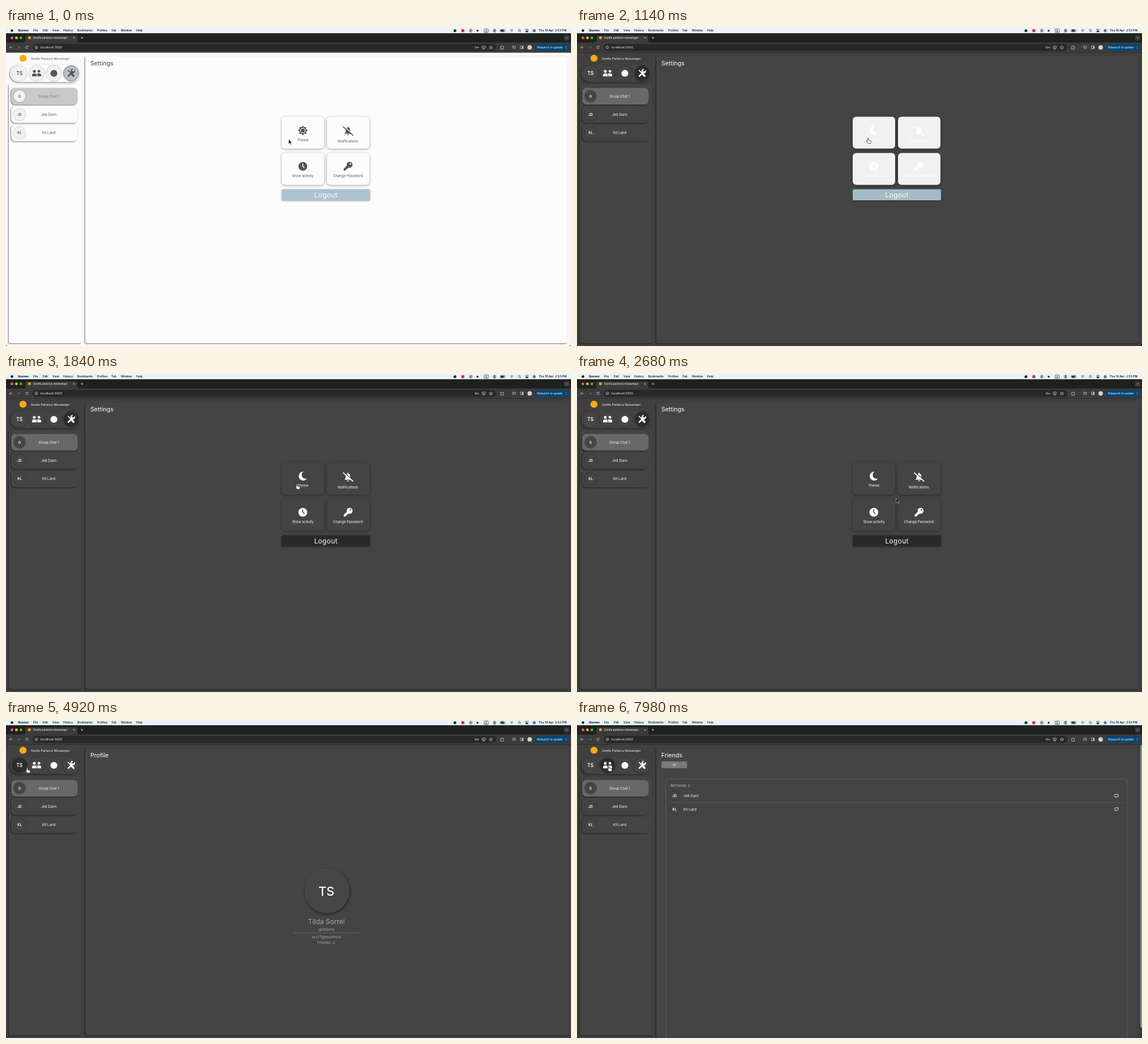
Write an HTML page that moves like this. It is 998 px wide and 561 px high and loops after 8000 ms.

```html
<!DOCTYPE html>
<html lang="en">
<head>
<meta charset="utf-8">
<title>Messenger settings</title>
<style>
html, body { margin: 0; width: 100%; height: 100%; overflow: hidden; background: #000; }
svg { display: block; width: 998px; height: 561px; font-family: Inter, Roboto, sans-serif;
  --page: #f9f9f9; --panel: #fcfcfc; --ink: #555; --title: #444; --item: #fcfcfc; --pick: #c9c9c9;
  --pickText: #777; --avatar: #f0f1f2; --shade: rgba(0,0,0,.55); --soft: rgba(0,0,0,.38); }
svg.dark { --page: #404040; --panel: #444; --ink: #fff; --title: #fff; --item: #444; --pick: #686868;
  --pickText: #f4f4f4; --avatar: #454545; --shade: rgba(0,0,0,.5); --soft: rgba(0,0,0,.4); }
text { white-space: pre; }
.mid { text-anchor: middle; }
.bold { font-weight: 600; }
.ink { fill: var(--ink); }
.line { fill: none; stroke: var(--ink); }
.panel { fill: var(--panel); filter: drop-shadow(-1px 1px 1.3px var(--shade)); }
.item { fill: var(--item); filter: drop-shadow(-.4px 1px .8px var(--shade)); }
.pick { fill: var(--pick); }
.avatar { fill: var(--avatar); filter: drop-shadow(0 .5px .8px var(--soft)); }
.nav { filter: drop-shadow(0 .5px .8px var(--soft)); }
.tile { fill: var(--tile); filter: drop-shadow(0 1.5px 2px var(--soft)); }
.logout { fill: var(--logout); filter: drop-shadow(0 1px 1.5px var(--soft)); }
.hole { fill: var(--tile); }
.cut { fill: none; stroke: var(--tile); }
.title { fill: var(--title); font-size: 10.6px; }
.grey { fill: #a9a9a9; }
.glyph { fill: none; stroke: #d8d8d8; stroke-width: .75; }
.bar { fill: none; stroke: #222; stroke-width: .7; }
</style>
</head>
<body>
<svg id="stage" viewBox="0 0 998 561"></svg>
<script>
const text = (x, y, size, s, attr = '') => `<text x="${x}" y="${y}" font-size="${size}" ${attr}>${s}</text>`;
const box = (x, y, w, h, r, attr) => `<rect x="${x}" y="${y}" width="${w}" height="${h}" rx="${r}" ${attr}/>`;
const disc = (x, y, r, attr) => `<circle cx="${x}" cy="${y}" r="${r}" ${attr}/>`;
const path = (d, attr) => `<path d="${d}" ${attr}/>`;
const INK = 'class="ink"', MID = 'class="ink mid"', BOLD = 'class="ink mid bold"';

function menuBar() {
  const words = [['File', 48], ['Edit', 65], ['View', 82], ['History', 101], ['Bookmarks', 126],
    ['Profiles', 161], ['Tab', 186], ['Window', 203], ['Help', 230]];
  const bar = 'class="bar"';
  return box(0, 0, 998, 9.5, 0, 'fill="#e9f2f6"')
    + disc(10.5, 4.5, 2.3, 'fill="#111"')
    + text(21, 6.4, 5.1, 'Quovex', 'font-weight="700"')
    + words.map(([s, x]) => text(x, 6.4, 5, s, 'font-weight="500"')).join('')
    + disc(793, 4.7, 2.5, 'fill="#222"')
    + box(804.5, 2.2, 5, 5, 0, 'fill="#d32532"')
    + disc(821, 4.7, 2.5, bar) + path('M820.2 3.4v2.6l2.2-1.3z', '')
    + disc(833, 4.7, 1.7, 'fill="#222"')
    + box(844.5, 1.8, 7.5, 6, 1, bar) + text(848.2, 6.5, 4.8, 'A', 'class="mid"')
    + disc(863, 4.7, 2.5, bar) + disc(863, 4, .9, '') + path('M861.3 6.4q1.7-1.6 3.4 0z', '')
    + box(873, 2.7, 8.4, 4, 1, bar) + box(874, 3.6, 5.5, 2.2, .4, '')
    + path('M890.5 3.9q2.8-2.4 5.6 0M891.8 5.3q1.5-1.3 3 0', bar) + disc(893.3, 6.5, .6, '')
    + disc(906.6, 4.2, 1.8, bar) + path('M908 5.6l1.6 1.6', bar)
    + box(917.6, 2.3, 5, 2, 1, bar) + box(917.6, 5.2, 5, 2, 1, 'fill="#222"')
    + disc(933, 4.7, 2.6, 'fill="#5c6c9c"')
    + text(941, 6.4, 5.1, 'Thu 18 Apr  2:53 PM', 'font-weight="500"');
}

function browserBar() {
  const c = 'class="glyph"', lit = 'fill="#d8d8d8"';
  return box(0, 9.5, 998, 17, 0, 'fill="#1f2020"')
    + ['#ff5f57', '#febc2e', '#28c840'].map((f, i) => disc(10.5 + 7.9 * i, 17.4, 2.4, `fill="${f}"`)).join('')
    + path('M31 26q3 0 3-3v-7q0-3 3-3h86q3 0 3 3v7q0 3 3 3z', 'fill="#3b3b3b"')
    + disc(41.4, 17.3, 2.5, 'fill="#f9b000"')
    + text(48, 19, 4.6, 'Gentle parlance messenger', 'fill="#eee" font-weight="500"')
    + path('M118.8 16.1l2.6 2.6m0-2.6l-2.6 2.6M132 17.4h4.4m-2.2-2.2v4.4', c)
    + box(985.5, 13, 9.5, 9, 2.5, 'fill="#3b3b3b"') + path('M988.8 16.8l1.5 1.5 1.5-1.5', c)
    + box(0, 25.5, 998, 18, 0, 'fill="#3b3b3b"')
    + box(47, 28, 819, 12.6, 6.3, 'fill="#282828"')
    + path('M11.4 34.2H6.8m2-2.1l-2.1 2.1 2.1 2.1', c)
    + path('M20.6 34.2h4.6m-2-2.1l2.1 2.1-2.1 2.1', 'class="glyph" opacity=".4"')
    + path('M38.6 32.8a2.2 2.2 0 1 0 .4 2.1M39 31.5v1.7h-1.7', c)
    + disc(53.6, 34.2, 2.3, c) + path('M53.6 33.9v1.5M53.6 32.6v.5', c)
    + text(61, 36.1, 5.4, 'localhost:3000', 'fill="#eee"')
    + disc(829.8, 34.2, 1.5, c) + path('M831.3 34.2h3.7v1.4m-1.5-1.4v1.2', c)
    + box(841, 31.9, 5.8, 3.8, .6, c) + path('M842.5 37h3M844 33v1.5', c)
    + path('M856.5 31.4l.9 1.8 2 .2-1.5 1.4.4 2-1.8-1-1.8 1 .4-2-1.5-1.4 2-.2z', c)
    + path('M873.8 32.5h1.5q.8-1.9 1.6 0h1.6v1.6q1.8.8 0 1.6v1.5h-4.7z', c)
    + path('M894.4 32.2h4.4M894.4 33.9h3M894.4 35.6h2M899.4 36v-3.6h1', c) + disc(898.7, 36, .8, lit)
    + box(908.6, 31.9, 5, 4.6, .6, c) + box(911.6, 31.9, 2, 4.6, 0, lit)
    + disc(925, 34.2, 3.9, 'fill="#d6d2c8"')
    + box(934, 28.6, 60, 11.6, 5.8, 'fill="#064673"')
    + text(938, 36, 4.95, 'Relaunch to update', 'fill="#cfe9fb" font-weight="500"')
    + [32.2, 34.2, 36.2].map(y => disc(989.6, y, .55, 'fill="#cfe9fb"')).join('');
}

const navX = [23.7, 54.2, 84.6, 115];
const people = [['G', 'Group Chat 1'], ['JD', 'Jed Dunn'], ['KL', 'Kit Lund']];

function sidebar() {
  return disc(30, 53.4, 6.2, 'fill="#f9ab0e"')
    + text(44, 55.8, 5.25, 'Gentle Parlance Messenger', INK)
    + box(7, 65, 124, 30.5, 15.2, 'class="panel"')
    + navX.map(x => disc(x, 80, 13.4, 'class="nav"')).join('')
    + text(23.7, 83, 8.4, 'TS', BOLD)
    + disc(50, 76.4, 2.5, INK) + disc(58.2, 76.4, 2.4, INK)
    + path('M46 85.3v-1.8q0-3.3 3.2-3.3h1.7q3.4 0 3.4 3.3v1.8zM55.4 85.3v-2q0-1.8-1-3.1h4.4q3.3 0 3.3 3.3v1.8z', INK)
    + disc(84.6, 80, 6.1, INK)
    + path('M110.2 84.9l7.6-7.6', 'class="line" stroke-width="2.7" stroke-linecap="round"')
    + path('M120.7 74.9a3.1 3.1 0 1 1-3-1.8', 'class="line" stroke-width="2"')
    + path('M109.4 74.4l5.2 5.2', 'class="line" stroke-width="1.6"')
    + path('M116 81.2l3.4 3.4', 'class="line" stroke-width="3.4" stroke-linecap="round"')
    + box(5, 100, 128, 456, 3, 'class="panel"')
    + people.map(([short, name], i) => {
      const y = 120.3 + 32.4 * i;
      return box(9.2, y - 14.6, 117.3, 29.3, 7, `class="item ${i ? '' : 'pick'}"`)
        + disc(24, y, 10.5, 'class="avatar"')
        + text(24, y + 2.2, 6, short, BOLD)
        + text(75.5, y + 2.2, 5.95, name, i ? MID : 'class="mid" fill="var(--pickText)"');
    }).join('');
}

function settings() {
  const star = Array.from({ length: 16 }, (_, i) => {
    const r = i % 2 ? 6.2 : 8.6, a = i * Math.PI / 8;
    return `${524.3 + r * Math.cos(a)},${180.8 + r * Math.sin(a)}`;
  }).join(' ');
  return text(149, 66.4, 10.6, 'Settings', 'class="title"')
    + [[487, 156.5], [567, 156.5], [487, 220.5], [567, 220.5]].map(([x, y]) => box(x, y, 75, 56.3, 6, 'class="tile"')).join('')
    + `<g id="sun"><polygon points="${star}" class="ink"/>${disc(524.3, 180.8, 4.2, 'class="cut" stroke-width="1.2"')}`
    + text(524.3, 200.2, 6.05, 'Theme', MID) + '</g>'
    + '<g id="moon">' + path('M525.5 172.2a7.9 7.9 0 1 0 6 12.4q-8.6 1.4-9.2-6.3q0-4 3.2-6.1z', INK)
    + text(524.3, 198.7, 6.05, 'Theme', MID) + '</g>'
    + path('M598 186.6q2.2-2 2.2-6q0-4 3-4.8v-1.6h1.8v1.6q3 .8 3 4.8q0 4 2.2 6z', INK)
    + path('M602.2 187.8h4q-2 3-4 0z', INK)
    + path('M596.3 173.2l17 15', 'class="cut" stroke-width="1.8"')
    + path('M595.8 174.4l16.8 14.6', 'class="line" stroke-width="1.7" stroke-linecap="round"')
    + text(604, 201.8, 6.05, 'Notifications', MID)
    + disc(524.3, 244, 7.8, INK) + path('M524.3 239v5.2l2.8 2.3', 'class="cut" stroke-width="1.5"')
    + text(524.3, 262.6, 6.05, 'Show activity', MID)
    + disc(606.9, 241.2, 5.2, INK)
    + path('M603.4 241.6l-6.9 6.9v3h3.5v-1.8h1.8v-1.8h1.8l3-3z', INK) + disc(608.3, 239.8, 1.4, 'class="hole"')
    + text(604, 262.6, 6.1, 'Change Password', MID)
    + box(487, 284.5, 156, 19.5, 2.5, 'class="logout"')
    + text(565.2, 298.9, 11.7, 'Logout', 'class="mid" fill="#fff" letter-spacing=".5"');
}

function profile() {
  const mid = 'class="grey mid"';
  return text(149, 66.4, 10.6, 'Profile', 'class="title"')
    + disc(567, 301.5, 38.8, 'class="avatar" stroke="#515151" style="filter:drop-shadow(1px 2px 2.5px rgba(0,0,0,.55))"')
    + text(566, 310, 21.5, 'TS', 'class="ink mid" font-weight="500"')
    + text(566, 359.5, 12, 'Tilda Sorrel', mid)
    + text(566, 371.7, 5.9, '@tilda456', mid)
    + box(508, 375.2, 116, .7, 0, 'fill="#747474"')
    + text(566, 384.6, 6.65, 'acct7@localhost', mid)
    + text(565.5, 395, 6.65, 'Friends: 2', mid);
}

function friends() {
  return box(140, 50, 849, 540, 3, 'class="panel"')
    + box(994.5, 43.5, 3.5, 518, 0, 'fill="#383838"') + box(995, 44, 3, 499, 1.5, 'fill="#8a8a8a"')
    + text(149, 66.4, 10.6, 'Friends', 'class="title"')
    + box(149, 73, 45.5, 12, 2, 'fill="#7a7a7a"') + text(171.8, 80.9, 5.2, 'All', MID)
    + box(156.8, 103.8, 815, 490, 4, 'fill="none" stroke="#646464" stroke-width=".8"')
    + text(165, 118.2, 5.5, 'All Friends: 2', 'class="grey bold"')
    + box(165, 145.4, 799, .7, 0, 'fill="#606060"')
    + people.slice(1).map(([short, name], i) => {
      const y = 133.8 + 23.6 * i;
      return disc(172.3, y, 7.6, 'class="avatar"') + text(172.3, y + 2.2, 6, short, BOLD)
        + text(188, y + 2.2, 5.95, name, INK)
        + path(`M950 ${y - 2.6}h6v4.3h-3l-1.5 1.5v-1.5h-1.5z`, 'class="line" stroke-width=".8" stroke-linejoin="round"');
    }).join('');
}

const stage = document.getElementById('stage');
stage.innerHTML = box(0, 0, 998, 561, 0, 'fill="#000"') + menuBar() + browserBar()
  + path('M0 43.5H998V558q0 3-3 3H3q-3 0-3-3z', 'fill="var(--page)"') + sidebar()
  + '<g id="mainPanel">' + box(140, 50, 852, 506, 3, 'class="panel"') + '</g>'
  + `<g id="settings">${settings()}</g><g id="profile">${profile()}</g><g id="friends">${friends()}</g>`
  + '<g id="cursor">'
  + path('M0 0V8.3L1.9 6.6 3.1 9.4 4.4 8.8 3.2 6.2H5.8Z', 'id="arrow" fill="#000" stroke="#fff" stroke-width=".5"')
  + path('M-1 1Q0-.5 1 1V4L4.4 4.7Q5.6 5.1 5.4 6.4L4.8 8.6V9.8H.3L-2.6 6.2Q-3.1 5.1-2.2 4.9L-1 5.7Z',
    'id="hand" fill="#fff" stroke="#111" stroke-width=".7" stroke-linejoin="round"')
  + '</g>';

const find = id => document.getElementById(id);
const show = (id, on) => { find(id).style.display = on ? '' : 'none'; };
const navDiscs = [...stage.querySelectorAll('.nav')];
const THEME = 1130, PROFILE = 4400, FRIENDS = 7410;

const clamp = v => Math.min(1, Math.max(0, v));
const fade = (t, start) => Math.sin(clamp((t - start) / 300) * Math.PI / 2);
const mix = (a, b, k) => `rgb(${a.map((v, i) => v + (b[i] - v) * k)})`;
const grey = v => [v, v, v];

// time, x, y of the pointer's hot spot
const route = [[0, 499.3, 196.3], [20, 499.3, 196.3], [820, 514, 193.8], [1900, 514, 193.8], [3240, 594, 234.8],
  [3300, 594, 234.8], [3620, 34, 84.6], [3760, 33.3, 84.6], [4500, 33.3, 84.6], [5900, 52.2, 81.2],
  [6140, 53.3, 81.2], [7960, 53.3, 81.2], [7980, 56.5, 81], [8000, 56.5, 81]];

function pointerAt(t) {
  const i = Math.max(1, route.findIndex(p => p[0] > t));
  const [t0, x0, y0] = route[i - 1], [t1, x1, y1] = route[i];
  const p = (t - t0) / (t1 - t0), k = p * p * (3 - 2 * p);
  return [x0 + (x1 - x0) * k, y0 + (y1 - y0) * k];
}

function draw(t) {
  const dark = t >= THEME, theme = fade(t, THEME);
  const toProfile = fade(t, PROFILE), toFriends = fade(t, FRIENDS);
  stage.classList.toggle('dark', dark);
  stage.style.setProperty('--tile', mix(grey(252), grey(68), theme));
  stage.style.setProperty('--logout', mix([171, 196, 206], grey(41), theme));
  const picked = [toProfile - toFriends, toFriends, 0, 1 - toProfile];
  navDiscs.forEach((d, i) => {
    d.style.fill = dark ? mix(grey(69), grey(44), picked[i]) : mix([240, 241, 242], [184, 191, 195], picked[i]);
    d.style.stroke = !dark && picked[i] ? '#85898b' : 'none';
  });
  show('sun', !dark);
  show('moon', dark);
  show('settings', t < PROFILE);
  show('profile', t >= PROFILE && t < FRIENDS);
  show('friends', t >= FRIENDS);
  show('mainPanel', t < FRIENDS);

  const [x, y] = pointerAt(t);
  const onNav = x < 131 && y < 96;
  const onTile = t > 100 && x > 487 && x < 642 && y > 156 && y < 277 && (x < 562 || x > 567);
  show('hand', onNav || onTile);
  show('arrow', !onNav && !onTile);
  find('cursor').setAttribute('transform', `translate(${x} ${y})`);
}

function tick() {
  draw(performance.now() % 8000);
  requestAnimationFrame(tick);
}
tick();
</script>
</body>
</html>
```
